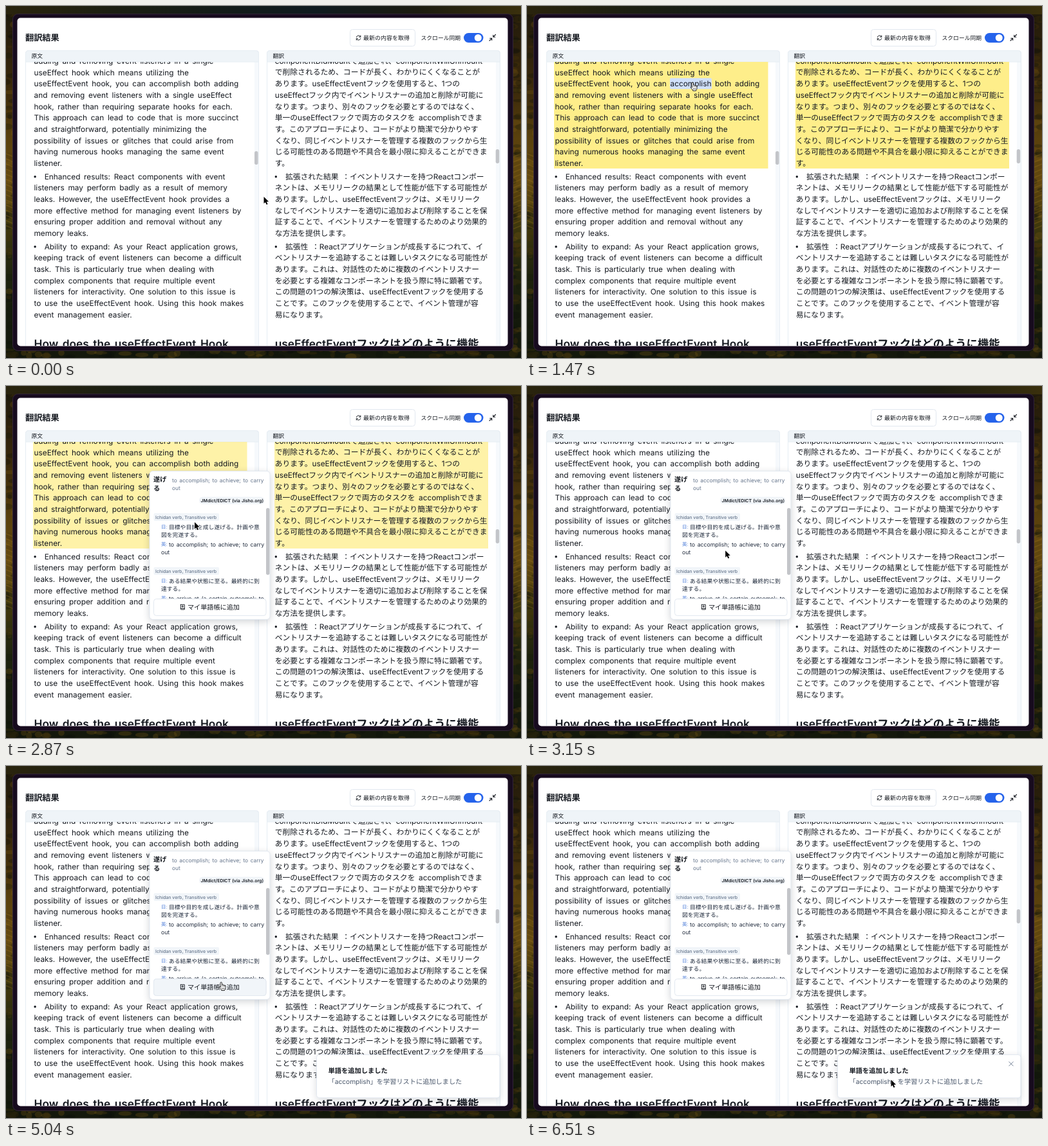
Write an HTML page with a canvas that moves like this. It is 800 by 548 pixels and loops after 6.79 s.

```html
<!DOCTYPE html>
<html lang="ja">
<head>
<meta charset="utf-8">
<title>翻訳結果</title>
<style>
  html, body { margin: 0; width: 100%; height: 100%; overflow: hidden; background: #17150f; }
  canvas { display: block; width: 800px; height: 548px; font-family: Inter, "Noto Sans CJK JP", sans-serif; }
</style>
</head>
<body>
<canvas id="stage"></canvas>
<script>
const W = 800, H = 548, LOOP = 6790, STEP = 70;
const FONT = 'Inter, "Noto Sans CJK JP", "Noto Sans CJK", sans-serif';
const INK = '#14181f', GRAY = '#64748b', LINE = '#e2e8f0', PALE = '#f1f5f9';

const canvas = document.getElementById('stage');
const dpr = window.devicePixelRatio || 1;
canvas.width = W * dpr;
canvas.height = H * dpr;
const ctx = canvas.getContext('2d');

const english = [[
  'adding and removing event listeners in a single',
  'useEffect hook which means utilizing the',
  'useEffectEvent hook, you can accomplish both adding',
  'and removing event listeners with a single useEffect',
  'hook, rather than requiring separate hooks for each.',
  'This approach can lead to code that is more succinct',
  'and straightforward, potentially minimizing the',
  'possibility of issues or glitches that could arise from',
  'having numerous hooks managing the same event',
  'listener.'
], [
  'Enhanced results: React components with event',
  'listeners may perform badly as a result of memory',
  'leaks. However, the useEffectEvent hook provides a',
  'more effective method for managing event listeners by',
  'ensuring proper addition and removal without any',
  'memory leaks.'
], [
  'Ability to expand: As your React application grows,',
  'keeping track of event listeners can become a difficult',
  'task. This is particularly true when dealing with',
  'complex components that require multiple event',
  'listeners for interactivity. One solution to this issue is',
  'to use the useEffectEvent hook. Using this hook makes',
  'event management easier.'
]];

const japanese = [[
  'componentDidMountで追加され、componentWillUnmount',
  'で削除されるため、コードが長く、わかりにくくなることが',
  'あります。useEffectEventフックを使用すると、1つの',
  'useEffectフック内でイベントリスナーの追加と削除が可能に',
  'なります。つまり、別々のフックを必要とするのではなく、',
  '単一のuseEffectフックで両方のタスクを accomplishできま',
  'す。このアプローチにより、コードがより簡潔で分かりやす',
  'くなり、同じイベントリスナーを管理する複数のフックから生',
  'じる可能性のある問題や不具合を最小限に抑えることができま',
  'す。'
], [
  '拡張された結果 ：イベントリスナーを持つReactコンポー',
  'ネントは、メモリリークの結果として性能が低下する可能性が',
  'あります。しかし、useEffectEventフックは、メモリリーク',
  'なしでイベントリスナーを適切に追加および削除することを保',
  '証することで、イベントリスナーを管理するためのより効果的',
  'な方法を提供します。'
], [
  '拡張性 ：Reactアプリケーションが成長するにつれて、イ',
  'ベントリスナーを追跡することは難しいタスクになる可能性が',
  'あります。これは、対話性のために複数のイベントリスナー',
  'を必要とする複雑なコンポーネントを扱う際に特に顕著です。',
  'この問題の1つの解決策は、useEffectEventフックを使用する',
  'ことです。このフックを使用することで、イベント管理が容',
  '易になります。'
]];

// Row geometry shared by both columns
const ROW = 17.68, TOP = 85.5, GAP = 3;
const BODY = 11.85, BODY_WS = 2.35;

const clamp = v => Math.max(0, Math.min(1, v));
const ramp = (t, a, b) => clamp((t - a) / (b - a));
const smooth = v => v * v * (3 - 2 * v);
const easeOut = v => 1 - (1 - v) ** 3;

function setFont(c, size, weight = 400, ws = 0) {
  c.font = `${weight} ${size}px ${FONT}`;
  c.wordSpacing = ws + 'px';
  c.textRendering = 'geometricPrecision';
}

// cy is the optical middle of the line
function text(c, str, x, cy, size, color = INK, weight = 400, ws = 0) {
  setFont(c, size, weight, ws);
  c.fillStyle = color;
  c.fillText(str, x, cy + size * 0.365);
}

function box(c, x, y, w, h, r, fill, stroke) {
  c.beginPath();
  c.roundRect(x, y, w, h, r);
  if (fill) { c.fillStyle = fill; c.fill(); }
  if (stroke) { c.strokeStyle = stroke; c.lineWidth = 1; c.stroke(); }
}

function card(c, x, y, w, h, r, blur, alpha) {
  c.save();
  c.shadowColor = `rgba(15,23,42,${alpha})`;
  c.shadowBlur = blur * dpr;
  c.shadowOffsetY = 3 * dpr;
  box(c, x, y, w, h, r, '#fff');
  c.restore();
  box(c, x, y, w, h, r, null, LINE);
}

function stroke(c, d, color = INK, width = 1) {
  c.strokeStyle = color;
  c.lineWidth = width;
  c.lineCap = c.lineJoin = 'round';
  c.stroke(new Path2D(d));
}

function layer(paint) {
  const el = document.createElement('canvas');
  el.width = canvas.width;
  el.height = canvas.height;
  const c = el.getContext('2d');
  c.scale(dpr, dpr);
  paint(c);
  return el;
}

function gradient(c, x, y, colors) {
  const g = c.createLinearGradient(0, 0, x, y);
  colors.forEach((color, i) => g.addColorStop(i / (colors.length - 1), color));
  return g;
}

function paintBackdrop(c) {
  c.fillStyle = gradient(c, 0, H, ['#1f1a0c', '#2e210b', '#3d2b0b', '#5a410d', '#644a10', '#3f380d', '#20240d', '#151b0c', '#14180c']);
  c.fillRect(0, 0, W, H);

  let seed = 7;
  const rnd = () => (seed = seed * 16807 % 2147483647) / 2147483647;
  const tones = ['#0b0f0a', '#4a360c', '#7a5a14', '#12180b'];
  c.globalAlpha = 0.28;
  for (let i = 0; i < 260; i++) {
    const side = rnd() < 0.5;
    const x = side ? rnd() * W : (rnd() < 0.5 ? rnd() * 14 : W - rnd() * 14);
    const y = side ? H - rnd() * 14 : rnd() * H;
    c.fillStyle = tones[Math.floor(rnd() * 4)];
    c.beginPath();
    c.ellipse(x, y, 3 + rnd() * 9, 2 + rnd() * 4, 0, 0, 7);
    c.fill();
  }
  c.strokeStyle = '#a17a20';
  c.lineWidth = 1.5;
  for (let y = 230; y < 350; y += 8) {
    c.beginPath();
    c.moveTo(0, y); c.lineTo(12, y + 5);
    c.moveTo(W - 12, y + 5); c.lineTo(W, y);
    c.stroke();
  }
  c.globalAlpha = 1;
  c.fillStyle = gradient(c, W, 0, ['#2a240d', '#1c1f12', '#141c18', '#101c20', '#1c1c10', '#3a300d']);
  c.fillRect(0, 0, W, 13);
}

function paintShell(c) {
  paintBackdrop(c);
  box(c, 10.5, 12.5, 777, 524, 8, '#170b1e', '#332539');
  box(c, 17.5, 18.5, 762, 511, 5, '#fff');

  text(c, '翻訳結果', 30, 49.5, 13.2, INK, 700);

  box(c, 534.5, 36.5, 101, 26, 4, '#fff', LINE);
  stroke(c, 'M544.4 48.6A3.2 3.2 0 0 1 550.2 47.4L550.8 48.2M550.8 46V48.2H548.6' +
            'M550.7 50.6A3.2 3.2 0 0 1 544.9 51.6L544.3 50.8M544.3 53V50.8H546.5', INK, 0.9);
  text(c, '最新の内容を取得', 555, 49.5, 9, INK, 500);
  text(c, 'スクロール同期', 644.5, 49.5, 8.8, INK, 500);

  box(c, 711, 42, 30.5, 15, 7.5, '#2563eb');
  c.fillStyle = '#fff';
  c.beginPath();
  c.arc(733.3, 49.5, 5.5, 0, 7);
  c.fill();
  stroke(c, 'M760.5 44.5L756.8 48.2M756.8 45.2V48.2H759.8M751 54L754.7 50.3M751.7 50.3H754.7V53.3', INK, 1.1);

  [[30, '原文'], [405, '翻訳']].forEach(([x, label]) => {
    c.save();
    c.beginPath();
    c.rect(x - 1, 68, 365, 461);
    c.clip();
    box(c, x + 0.5, 69.5, 362, 480, 4, '#fff', '#e6edf3');
    c.fillStyle = '#f6f9fc';
    c.fillRect(x + 356, 87, 6, 442);
    c.restore();
    box(c, x + 0.5, 69.5, 362, 17.5, [4, 4, 0, 0], '#eff4f8', '#e6edf3');
    text(c, label, x + 9.5, 78, 8.8, INK);
  });
}

function eachRow(blocks, fn) {
  let cy = TOP;
  blocks.forEach((rows, b) => {
    rows.forEach((row, i) => { fn(row, cy, b, i); cy += ROW; });
    cy += GAP;
  });
}

function paintColumn(c, blocks, x, size, heading) {
  eachRow(blocks, (row, cy, b, i) => {
    const first = b > 0 && i === 0;
    if (first) {
      c.fillStyle = INK;
      c.beginPath();
      c.arc(x + 1.6, cy + 0.4, 1.7, 0, 7);
      c.fill();
    }
    text(c, row, first ? x + 16.2 : x, cy, size, INK, 400, BODY_WS);
  });
  text(c, heading, x, 525.7, 17.3, INK, 600, 2.2);
}

function paintBody(c) {
  c.beginPath();
  c.rect(18, 87, 761, 442);
  c.clip();
  paintColumn(c, english, 43.5, BODY, 'How does the useEffectEvent Hook');
  paintColumn(c, japanese, 417.7, 11.8, 'useEffectEventフックはどのように機能');
  box(c, 386, 226, 5.5, 21, 2.7, '#c3c5c9');
  box(c, 760.7, 223, 5.5, 22, 2.7, '#c3c5c9');
}

function paintPopup(c, hover) {
  const ws = 1.3;
  card(c, 223, 132.5, 187, 231, 5, 12, 0.2);
  text(c, '遂げ', 229, 145.5, 10.3, INK, 700);
  text(c, 'る', 229, 159.5, 10.3, INK, 700);
  text(c, 'to accomplish; to achieve; to carry', 258, 147, 8.35, GRAY, 400, ws);
  text(c, 'out', 258, 158.5, 8.35, GRAY);
  box(c, 300, 172.5, 101.5, 11.5, 5.5, PALE);
  text(c, 'JMdict/EDICT (via Jisho.org)', 302.5, 178.3, 6.95, INK, 600, 0.5);

  c.save();
  c.beginPath();
  c.rect(223, 190, 187, 141);
  c.clip();
  const sense = (y, ja, jaRest, en, enRest) => {
    box(c, 229.5, y - 6, 101.5, 12, 2, PALE);
    text(c, 'Ichidan verb, Transitive verb', 232, y, 7, GRAY, 500);
    text(c, '日:', 241, y + 15.5, 7.5, '#4a7bd8');
    text(c, ja, 253, y + 15.5, 8.8, '#1e293b');
    text(c, jaRest, 241, y + 27.5, 8.8, '#1e293b');
    text(c, '英:', 241, y + 42.5, 7.5, '#4a7bd8');
    text(c, en, 253, y + 42.5, 8.7, '#1e293b', 400, ws);
    text(c, enRest, 241, y + 54.5, 8.7, '#1e293b');
  };
  sense(204, '目標や目的を成し遂げる。計画や意', '図を完遂する。', 'to accomplish; to achieve; to carry', 'out');
  sense(288, 'ある結果や状態に至る。最終的に到', '達する。', 'to arrive at (a certain outcome); to', '');
  c.restore();
  box(c, 404, 190, 5.5, 104, 2.7, '#c3c5c9');

  box(c, 229.5, 331.5, 174.5, 26, 4, '#fff', LINE);
  c.save();
  c.globalAlpha *= hover;
  box(c, 229.5, 331.5, 174.5, 26, 4, PALE, LINE);
  c.restore();
  stroke(c, 'M271.3 340.3H277.3V348H272.2Q271.3 348 271.3 347V340.3M271.4 346.3H277.3M274.3 341.6V344.6M272.8 343.1H275.8', INK, 0.9);
  text(c, 'マイ単語帳に追加', 282, 344.3, 10.15, INK, 500);
}

function paintToast(c, rise, close) {
  c.save();
  c.beginPath();
  c.rect(18, 19, 761, 510);
  c.clip();
  c.translate(0, (1 - rise) * 82);
  card(c, 482.5, 449.5, 284.5, 67, 4, 12, 0.16);
  text(c, '単語を追加しました', 500.5, 474, 10.25, INK, 700);
  text(c, '「accomplish」を学習リストに追加しました', 500.5, 491.5, 10.2, '#475569');
  if (close) stroke(c, 'M748.8 460.5L755.2 466.9M755.2 460.5L748.8 466.9', GRAY, 0.9);
  c.restore();
}

const arrow = new Path2D('M0 0L0 10.6L2.4 8.4L4.2 12.2L6 11.4L4.3 7.7L7.6 7.5Z');
const hand = new Path2D('M-1 1.2q.1-1.2 1.2-1.2q1.1 0 1.2 1.2L1.6 4q1.4-.6 1.9.5q1.3-.4 1.8.6' +
  'q1.7-.2 1.7 1.3L7 9q-.2 2-1.3 3L5.5 13H.7L.5 12L-2.7 8q-.6-1.4.8-1.3L-.8 7.8Z');

function paintCursor(c, { x, y }, pointing) {
  c.save();
  c.translate(x, y);
  c.lineJoin = 'round';
  if (pointing) {
    c.fillStyle = '#fff';
    c.fill(hand);
    stroke(c, 'M1.6 4V6.5M3.5 4.6V6.7M5.3 5.2V7M1.3 9V11M3 9V11M4.7 9V11', '#222', 0.6);
    c.strokeStyle = '#111';
    c.lineWidth = 0.9;
    c.stroke(hand);
  } else {
    c.strokeStyle = '#fff';
    c.lineWidth = 1.8;
    c.stroke(arrow);
    c.fillStyle = '#000';
    c.fill(arrow);
  }
  c.restore();
}

// time, x, y of the pointer
const route = [
  [0, 400.5, 297], [70, 400.5, 297], [420, 399, 285], [560, 397, 280],
  [910, 268, 134], [1190, 258, 120], [1330, 257, 119], [2730, 257, 119],
  [2870, 293, 212], [3360, 318, 285], [3850, 334, 336.5], [5740, 334, 336.5],
  [6440, 565.5, 488.5], [LOOP, 565.5, 488.5]
];

function pointer(t) {
  const i = Math.max(1, route.findIndex(k => k[0] >= t));
  const [t0, x0, y0] = route[i - 1], [t1, x1, y1] = route[i];
  const k = smooth(ramp(t, t0, t1));
  return { x: x0 + (x1 - x0) * k, y: y0 + (y1 - y0) * k };
}

const inside = (p, x, y, w, h) => p.x >= x && p.x < x + w && p.y >= y && p.y < y + h;

function wordAt(p) {
  let hit = null;
  setFont(ctx, BODY, 400, BODY_WS);
  const width = s => ctx.measureText(s).width;
  const space = width('n n') - width('nn');
  eachRow(english.slice(0, 1), (row, cy) => {
    const top = cy - 8.5;
    if (p.y + 3 < top || p.y + 3 >= top + ROW) return;
    let x = 43.5;
    for (const word of row.split(' ')) {
      const w = width(word);
      if (p.x >= x && p.x < x + w) hit = { x, y: top, w };
      x += w + space;
    }
  });
  return hit;
}

const shell = layer(paintShell), body = layer(paintBody);

function draw(t) {
  const p = pointer(t);
  const popup = smooth(ramp(t, 1780, 1920));
  const glow = smooth(ramp(t, 690, 1060)) * (1 - smooth(ramp(t, 2730, 3150)));
  const toast = easeOut(ramp(t, 4410, 4760));
  const overPopup = popup > 0 && inside(p, 223, 132, 187, 232);
  const overButton = popup > 0 && inside(p, 229, 331, 175, 27);
  const word = overPopup ? null : wordAt(p);
  const hover = overButton ? ramp(t, 3780, 3920) : 0;

  ctx.setTransform(1, 0, 0, 1, 0, 0);
  ctx.drawImage(shell, 0, 0);
  ctx.setTransform(dpr, 0, 0, dpr, 0, 0);

  if (glow > 0) {
    ctx.globalAlpha = glow;
    ctx.fillStyle = '#feee8a';
    ctx.fillRect(42, 87, 332.5, 166);
    ctx.fillRect(417, 87, 332, 166);
    ctx.globalAlpha = 1;
  }
  if (word) box(ctx, word.x - 0.5, word.y, word.w + 1, 17, 2, '#d0e0fb');

  ctx.setTransform(1, 0, 0, 1, 0, 0);
  ctx.drawImage(body, 0, 0);
  ctx.setTransform(dpr, 0, 0, dpr, 0, 0);

  if (popup > 0) {
    const s = 0.95 + 0.05 * popup;
    ctx.save();
    ctx.globalAlpha = popup;
    ctx.translate(316 * (1 - s), 132 * (1 - s));
    ctx.scale(s, s);
    paintPopup(ctx, hover);
    ctx.restore();
  }
  if (toast > 0) paintToast(ctx, toast, inside(p, 482, 449, 285, 68));
  paintCursor(ctx, p, !!word || overButton);
}

const start = performance.now();
function tick() {
  const t = (performance.now() - start) % LOOP;
  draw(Math.floor(t / STEP) * STEP);
  requestAnimationFrame(tick);
}
tick();
</script>
</body>
</html>
```
